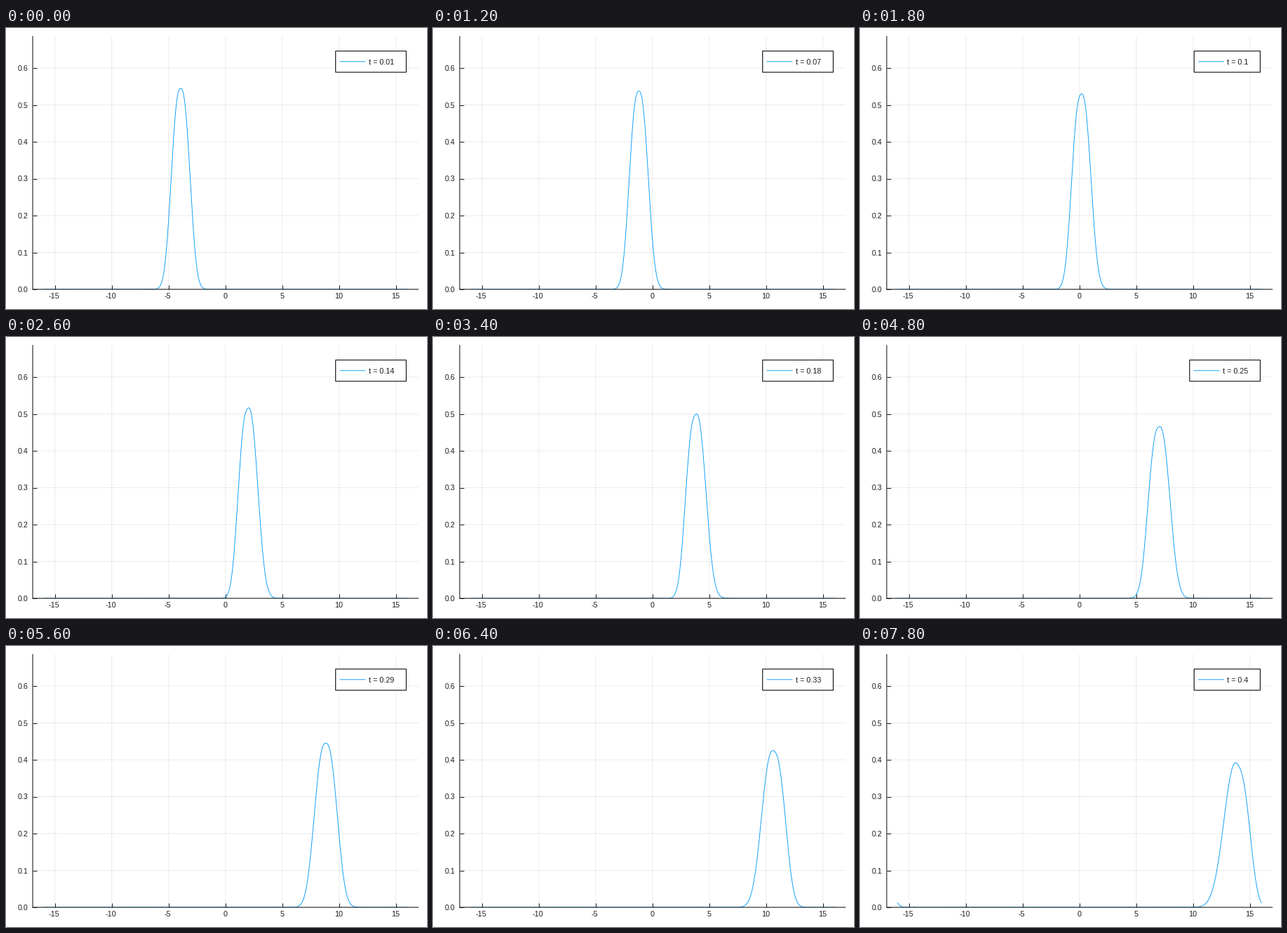
Write a matplotlib script that moves like this. It is 600 px wide and 400 px high and loops after 8000 ms.

```python
import numpy as np
import matplotlib.pyplot as plt
from matplotlib.animation import FuncAnimation
from matplotlib.patches import Rectangle

plt.rcParams["path.snap"] = False

W, H, DPI = 600, 400, 100
PX = 72 / DPI  # one pixel in points
FRAMES, INTERVAL = 40, 200
BLUE, INK = "#009afa", "#1c1c1c"
FONT = dict(family="Liberation Sans", size=10.8 * PX, color=INK, va="baseline")
X0, Y0 = 312.8, 372        # pixel position of the point (0, 0)
XSCALE, YSCALE = 16.2, 525  # pixels per unit
XMAX, PERIOD = 16.96, 32


def density(x, t):
    """Flat-topped packet that drifts, spreads and leans on a periodic domain."""
    centre = -4.4 + 45.6 * t
    peak = 0.545 / np.hypot(1, t / 0.41)
    width = 1 / (1.775 * peak)  # keeps the area at one
    lean = 2.7 * t * np.sin(2 * np.pi * t / 0.58)
    u = ((x - centre + PERIOD / 2) % PERIOD - PERIOD / 2) / width
    power = 2.5 - 0.4 * lean * np.sign(u)
    tilt = np.clip(1 + 0.13 * lean * u, 0, None)
    return peak * tilt * np.exp(-np.abs(u) ** power)


fig = plt.figure(figsize=(W / DPI, H / DPI), dpi=DPI, facecolor="white")

# Plot area
half = XMAX * XSCALE
ax = fig.add_axes([(X0 - half) / W, 1 - Y0 / H, 2 * half / W, 360 / H])
ax.set(xlim=(-XMAX, XMAX), ylim=(0, 360 / YSCALE))
xticks = np.arange(-15, 16, 5)
yticks = np.arange(7) / 10
ax.set_xticks(xticks, [])
ax.set_yticks(yticks, [])
ax.tick_params(direction="in", length=6 * PX, width=PX, color=INK)
ax.grid(color="black", alpha=0.08, linewidth=PX)
ax.set_axisbelow(True)
ax.spines[["top", "right"]].set_visible(False)
for side in ("left", "bottom"):
    ax.spines[side].set(linewidth=1.1 * PX, color=INK, zorder=5)

x = np.linspace(-16, 16, 1025)
curve, = ax.plot(x, np.zeros_like(x), color=BLUE, linewidth=0.9 * PX, zorder=3)

# Overlay in pixels for labels and legend
top = fig.add_axes([0, 0, 1, 1])
top.set(xlim=(0, W), ylim=(H, 0))
top.axis("off")
for v in xticks:
    nudge = 1.2 if v < 0 else 0.4
    top.text(X0 + XSCALE * v - nudge, 385, str(v), ha="center", **FONT)
for v in yticks:
    top.text(31.3, Y0 + 4 - YSCALE * v, f"{v:.1f}", ha="right", **FONT)

box = top.add_patch(Rectangle((0, 32.8), 1, 30.2, facecolor="white",
                              edgecolor=INK, linewidth=1.2 * PX))
key, = top.plot([0, 1], [47.8, 47.8], color=BLUE, linewidth=0.9 * PX)
label = top.text(0, 52, "", ha="left", **FONT)


def update(i):
    t = (i + 1) / FRAMES * 0.4
    curve.set_ydata(density(x, t))
    text = f"t = {t:.3g}"
    left = 469.7 if len(text) == 8 else 476.2  # the box fits its text
    box.set_x(left)
    box.set_width(570.4 - left)
    key.set_xdata([left + 6.3, left + 42.3])
    label.set_x(left + 47)
    label.set_text(text)
    return curve, box, key, label


anim = FuncAnimation(fig, update, frames=FRAMES, interval=INTERVAL,
                     repeat=True, repeat_delay=0, blit=False)
plt.show()
```
